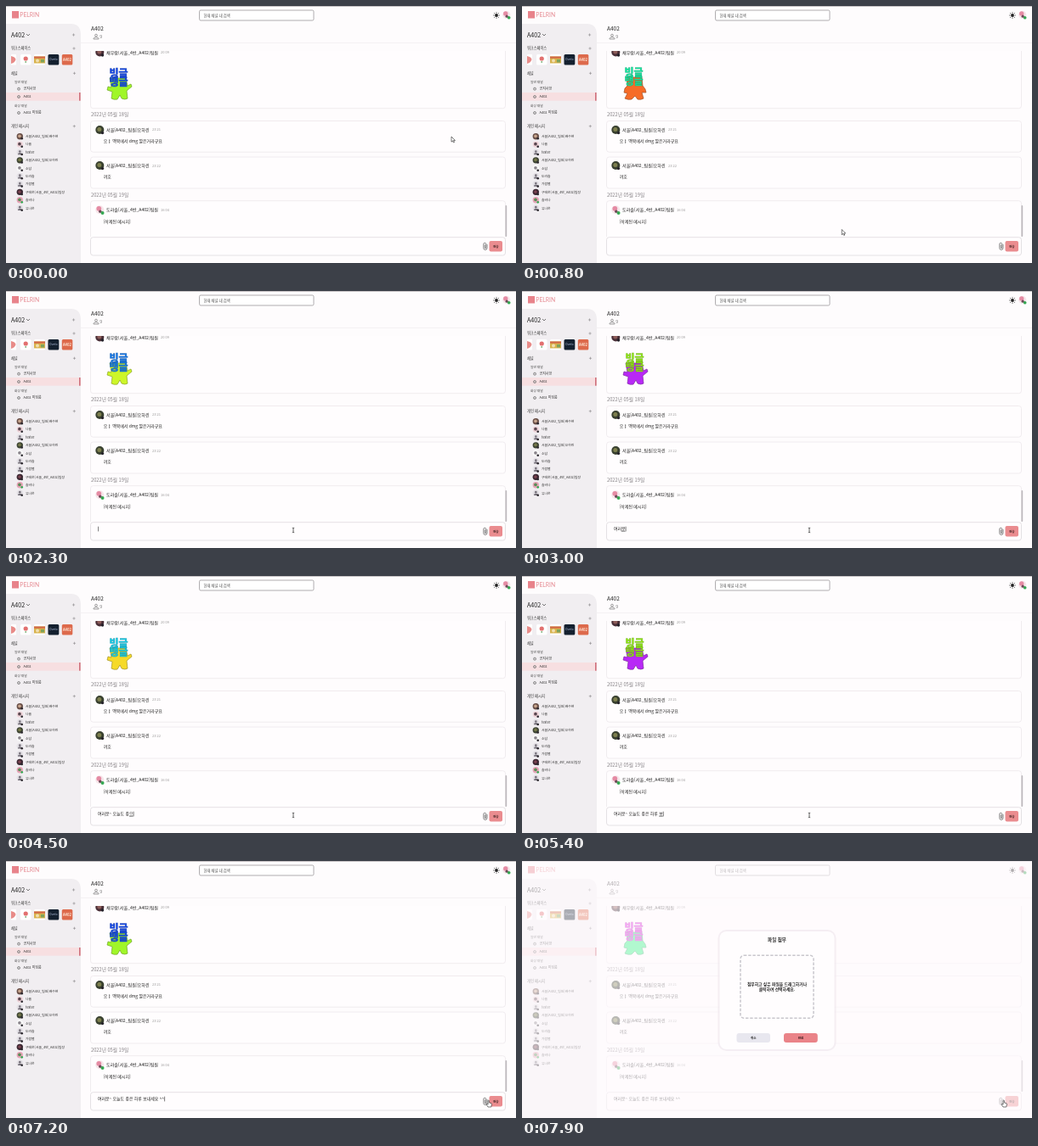
An HTML page for the animation above (8 s loop, 600x303 px).

```html
<!DOCTYPE html>
<html lang="ko">
<head>
<meta charset="utf-8">
<title>Team chat</title>
<style>
html, body { margin: 0; width: 100%; height: 100%; overflow: hidden; background: #fefcfd; }
svg { display: block; width: 600px; height: 303px; }
text { font-family: "Noto Sans CJK KR", "Noto Sans CJK", "Noto Sans", sans-serif; white-space: pre; }
</style>
</head>
<body>
<svg id="stage" viewBox="0 0 600 303" xmlns="http://www.w3.org/2000/svg"></svg>
<script>
const LOOP = 8000, STEP = 100;
const stage = document.getElementById('stage');

// Markup helpers; text is placed by its vertical centre.
const text = (x, y, str, size, fill = '#333', extra = '') =>
  `<text x="${x}" y="${y + size * 0.36}" font-size="${size}" fill="${fill}" ${extra}>${str}</text>`;
const rect = (x, y, w, h, fill, r = 0, extra = '') =>
  `<rect x="${x}" y="${y}" width="${w}" height="${h}" rx="${r}" fill="${fill}" ${extra}/>`;
const dot = (x, y, r, fill, extra = '') =>
  `<circle cx="${x}" cy="${y}" r="${r}" fill="${fill}" ${extra}/>`;
const line = (d, color, w = 0.6, extra = '') =>
  `<path d="${d}" fill="none" stroke="${color}" stroke-width="${w}" ${extra}/>`;
const plus = (x, y) => line(`M${x - 1.6} ${y}h3.2M${x} ${y - 1.6}v3.2`, '#8a868a', 0.6);
const mid = 'text-anchor="middle"';
const bold = 'font-weight="700"';

const person = (x, y, r, c) =>
  dot(x, y, r, '#e3e0e5') + dot(x, y - r * 0.25, r * 0.36, c) +
  `<path d="M${x - r * 0.65} ${y + r * 0.75}a${r * 0.65} ${r * 0.6} 0 0 1 ${r * 1.3} 0z" fill="${c}"/>`;
const photo = (x, y, r, a, b) =>
  dot(x, y, r, a) + dot(x - r * 0.1, y - r * 0.1, r * 0.5, b);
const pinkAvatar = (x, y, r) =>
  dot(x, y, r, '#f6e6ea') + dot(x - r * 0.2, y - r * 0.3, r * 0.58, '#e58ba4') +
  dot(x + r * 0.1, y + r * 0.4, r * 0.35, '#6e4a58') + dot(x + r * 0.65, y + r * 0.75, r * 0.4, '#35a853');

function header() {
  let sun = dot(577, 11, 1.9, '#222');
  for (let i = 0; i < 8; i++)
    sun += `<path d="M577 7.2v1.2" stroke="#222" stroke-width=".8" transform="rotate(${i * 45} 577 11)"/>`;
  return rect(0, 0, 600, 0.8, '#b9b6b8') +
    rect(7, 6, 8, 8.5, '#e8838b') +
    text(16.3, 10.6, 'PELRIN', 6.8, '#e58a92', 'style="font-family:Lato,sans-serif"') +
    rect(227.5, 5, 134.5, 12, '#fff', 1.6, 'stroke="#8d8a8d" stroke-width=".7"') +
    text(232.5, 11, '현재 채널 내 검색', 4.3, '#555') + sun + pinkAvatar(588.7, 10.3, 4.6);
}

function sidebar() {
  let s = `<path d="M0 21H76Q88 21 88 34V303H0z" fill="#f1eef1"/>` +
    text(6, 34, 'A402', 7.1, '#222') + line('M24 33l2 2l2-2', '#444', 0.7) + plus(79.5, 34) +
    text(6, 49.7, '워크스페이스', 4.2) + plus(80, 50) +
    text(6, 79.3, '채널', 4.2) + plus(80.5, 79.3) +
    text(6, 141.7, '개인 메시지', 4.3) + plus(80.3, 141.7);

  // Workspace tiles
  s += rect(6, 57, 6, 12.5, '#fff', 1) + `<path d="M6 59q5 1 5.5 4q-1 4-5.5 5z" fill="#e88b88"/>` +
    rect(17, 57, 12.5, 12.5, '#fff', 1.5) + dot(23.2, 62, 2.6, '#e2706f') + dot(23.2, 66, 1, '#85b783') +
    rect(33, 57, 13, 12.5, '#fff', 1.5) + rect(33, 59.5, 13, 8, '#d8b24c') +
    rect(33, 59.5, 13, 2.2, '#d26847') + dot(37, 64.5, 2, '#f0dfb0') + rect(41, 63, 4, 3.5, '#7fa35c') +
    rect(49.5, 57, 12.8, 12.5, '#14202f', 1.5) + text(55.9, 63.2, 'Ovelo', 3.6, '#b8c7e4', mid) +
    rect(65.8, 57, 12.5, 12.5, '#dd6a4c', 1.5) + text(72, 63.2, 'A402', 4.2, '#ffe9d8', mid + bold);

  s += rect(0, 102, 87.5, 9.7, '#f7dfe1') + rect(86, 102, 1.6, 9.7, '#cf6f7b') +
    text(10, 89.6, '일반 채널', 3.7, '#444') + text(10, 118, '화상 채널', 3.7, '#444');
  [[97.7, '공지사항'], [107, 'A402'], [126, 'A402 미팅룸']].forEach(([y, name]) => {
    s += dot(15, y, 1.5, 'none', 'stroke="#777" stroke-width=".8"') + dot(15, y, 0.5, '#777') +
      text(20.5, y, name, 4, '#333');
  });

  const people = [
    ['서울[A402_팀원]배수현', '#6a5048', '#c9a78f'], ['나율', '#efd5da', '#5b4850'], ['tester'],
    ['서울[A402_팀원]오하린', '#3d4433', '#75784a'], ['소담', '#fafafa', '#8b858c'], ['도라솔'], ['가람별'],
    ['구태온[서울_4반_A402]팀장', '#3a2630', '#7c4652'], ['솔비나', '#e5a3b5', '#5b8d57'], ['유나온']
  ];
  people.forEach(([name, a, b], i) => {
    const y = 153.7 + i * 9.38;
    s += (a ? photo(16.3, y, 3.7, a, b) : person(16.3, y, 3.7, '#77727b')) +
      dot(18.7, y + 2.6, 1.3, i === 8 ? '#35a853' : '#2b272d') + text(23, y, name, 3.85, '#333');
  });
  return s;
}

const card = (y, h) => rect(99.5, y, 488, h, '#fffdfe', 3, 'stroke="#ece8eb" stroke-width=".8"');
const sender = (y, name, tx, time) =>
  text(118, y, name, 5.1, '#222') + text(tx, y, time, 4, '#999');
const darkAvatar = y => photo(110.3, y, 5, '#39402f', '#7d7f4e') + dot(113.5, y + 3.6, 1.7, '#25222a');

function chat() {
  return text(100, 27, 'A402', 6.5, '#222') +
    dot(106, 34.6, 1.4, 'none', 'stroke="#777" stroke-width=".7"') +
    line('M103 39v-.6q.3-1.6 3-1.6t3 1.6v.6z', '#777', 0.7) + text(110.2, 36.3, '9', 5.4, '#777') +
    line('M88 43.5H600', '#f1edf0', 0.7) +
    `<clipPath id="list"><rect x="88" y="53" width="512" height="219"/></clipPath><g clip-path="url(#list)">` +
    card(40, 80.7) + photo(110.3, 54.5, 5, '#4b3038', '#8d5d5a') + dot(113.5, 58, 1.7, '#25222a') +
    sender(55, '채우람[서울_4반_A402]팀원', 182, '20:09') +
    text(100, 128, '2022년 05월 18일', 5.7, '#858185') +
    card(135.5, 36.7) + darkAvatar(146) + sender(146, '서울[A402_팀원]오하린', 172, '23:21') +
    text(114.7, 159.2, '오ㅑ 맥북에서 dmg 깔은거라규요', 4.95, '#222') +
    card(178, 37) + darkAvatar(188) + sender(188.2, '서울[A402_팀원]오하린', 172, '23:22') +
    text(114.7, 201.2, '꺄호', 4.95, '#222') +
    text(100, 222.6, '2022년 05월 19일', 5.7, '#858185') +
    card(229.7, 60) + pinkAvatar(110.3, 240.3, 5) +
    sender(240.6, '도라솔[서울_4반_A402]팀원', 182, '16:04') +
    text(114.7, 254, '[삭제된 메시지]', 4.95, '#222') + '</g>' +
    rect(587.5, 235, 1.7, 37, '#bdb9bd', 0.8) +
    rect(99.5, 272.7, 488, 21.3, '#fffdfe', 3, 'stroke="#dedade" stroke-width=".8"') +
    line('M566 281v4.4a2.1 2.1 0 0 1-4.2 0v-4.6a1.5 1.5 0 0 1 3 0v4.2a.7.7 0 0 1-1.5 0v-3.6', '#555', 0.7) +
    rect(568.5, 277, 15.5, 12.5, '#ea8c8f', 2) + text(576.2, 283.3, '전송', 3.6, '#3a2020', mid + bold);
}

function modal() {
  return rect(0, 0, 600, 303, '#fffbfd', 0, 'opacity=".64"') +
    rect(230.5, 81, 139, 143, '#eee6ed', 10, 'opacity=".6"') +
    rect(232.5, 83, 135, 139, '#fffdfe', 8) +
    text(300, 93.2, '파일 첨부', 5.5, '#222', mid + bold) +
    rect(257, 111.3, 86, 74, 'none', 4, 'stroke="#c9c7cd" stroke-width="1.5" stroke-dasharray="3.4 1.8"') +
    text(300, 145, '첨부하고 싶은 파일을 드래그하거나', 4.8, '#222', mid + bold) +
    text(300, 151.3, '클릭하여 선택하세요.', 4.8, '#222', mid + bold) +
    rect(252.5, 203, 39.5, 11, '#e8e7ef', 3) + text(272.2, 208.5, '취소', 3.6, '#333', mid + bold) +
    rect(308, 203, 39.8, 11, '#ea8388', 3) + text(328, 208.5, '완료', 3.6, '#3a1c1e', mid + bold);
}

stage.innerHTML = rect(0, 0, 600, 303, '#fefcfd') + header() + sidebar() + chat() +
  `<g id="sticker"><path id="body" stroke-width=".7" stroke-linejoin="round"/>
   <g id="word" font-weight="900" stroke-width=".5" text-anchor="middle">
   <text x="132" y="82.5" font-size="12">빙글</text><text x="132" y="92.5" font-size="12">뱅글</text></g></g>` +
  text(108, 280.6, '', 4.9, '#222', 'id="typed"') +
  `<path id="under" stroke="#333" stroke-width=".5"/><path id="caret" stroke="#222" stroke-width=".6"/>` +
  `<g id="modal">${modal()}</g>` +
  `<g id="arrow"><path d="M0 0V6.2L1.5 4.9L2.5 7L3.5 6.5L2.5 4.5H4.4Z" fill="#fff" stroke="#222" stroke-width=".6"/></g>
   <g id="beam">${line('M-1.2-2.8Q0-2.8 0-2V2Q0 2.8-1.2 2.8M1.2-2.8Q0-2.8 0-2M0 2Q0 2.8 1.2 2.8', '#222', 0.7)}</g>
   <g id="hand"><path d="M-.9-3.5q.8-.8 1.3 0v2.4l2.6.8q.6.3.4 1.2L2.8 4H-1L-3 .9q.2-1 1-.5l1.1.7z" fill="#fff" stroke="#222" stroke-width=".6"/></g>`;

const $ = id => document.getElementById(id);

// Every keystroke of a Korean line, one syllable part at a time.
const CHO = 'ㄱㄲㄴㄷㄸㄹㅁㅂㅃㅅㅆㅇㅈㅉㅊㅋㅌㅍㅎ';
function keystrokes(str) {
  const out = [''];
  let done = '';
  for (const ch of str) {
    const c = ch.charCodeAt(0) - 0xac00;
    if (c >= 0) {
      out.push(done + CHO[Math.floor(c / 588)]);
      if (c % 28) out.push(done + String.fromCharCode(0xac00 + c - c % 28));
    }
    done += ch;
    out.push(done);
  }
  return out;
}
const keys = keystrokes('여러분~ 오늘도 좋은 하루 보내세요');
const typedAt = t => {
  const n = Math.floor((t - 2300) / 100);
  const tail = t >= 6600 ? ' ^^' : t >= 6500 ? ' ^' : t >= 6300 ? ' ' : '';
  return keys[Math.max(0, Math.min(n, keys.length - 1))] + tail;
};

// Time, x, y of the pointer
const path = [[0, 524, 154], [200, 524, 154], [500, 455, 205], [900, 350, 283], [1400, 341, 285],
  [1900, 341, 285], [2200, 338, 282], [6500, 338, 282], [6800, 450, 284], [7100, 568, 286], [7300, 568, 286], [7600, 567, 286], [8000, 567, 286]];
function pointer(t) {
  const i = path.findIndex((p, k) => k && t <= p[0]);
  const a = path[i - 1], b = path[i], f = (t - a[0]) / (b[0] - a[0]);
  return [a[1] + (b[1] - a[1]) * f, a[2] + (b[2] - a[2]) * f];
}

// Word hue, body hue, pose for each beat of the sticker
const beats = [[225, 85, 0], [250, 95, 0], [270, 108, 1], [305, 178, 1], [340, 205, 1], [50, 240, 0],
  [85, 282, 0], [300, 145, 1], [160, 20, 1], [188, 52, 0], [200, 60, 0], [212, 72, 0]];
const poses = [
  'M122 85H141L143 94L147 92L148 95L142 100L143 109Q140 111 136 109L134 105L131 110Q127 111 124 109L125 101L119 99L120 95L124 96Z',
  'M123 84H141L142 94L145 98L146 102L141 102L143 109Q140 111 136 110L133 106L129 110Q125 111 121 109L124 103L120 102L121 97L124 94Z'
];

function draw(t) {
  const [word, body, pose] = beats[Math.floor(t / STEP) % beats.length];
  $('body').setAttribute('d', poses[pose]);
  $('body').setAttribute('fill', `hsl(${body} 92% 56%)`);
  $('body').setAttribute('stroke', `hsl(${body} 60% 40%)`);
  $('word').setAttribute('fill', `hsl(${word} 88% 50%)`);
  $('word').setAttribute('stroke', `hsl(${word} 75% 38%)`);
  $('word').setAttribute('transform', pose ? 'translate(-.5 0)' : 'translate(.5 1)');

  const str = typedAt(t);
  $('typed').textContent = str;
  const end = 108 + (str ? $('typed').getComputedTextLength() : 0);
  const composing = /[ㄱ-힣]$/.test(str) && t < 6100;
  $('under').setAttribute('d', composing ? `M${end - 4.5} 283.4H${end}` : '');
  $('caret').setAttribute('d', t >= 1900 && t < 7500 ? `M${end + 0.6} 277.7V283.4` : '');

  $('modal').setAttribute('opacity', t < 7500 ? 0 : t < 7600 ? 0.5 : 1);

  const [x, y] = pointer(t);
  const kind = y < 273 ? 'arrow' : x > 559 ? 'hand' : 'beam';
  for (const id of ['arrow', 'beam', 'hand']) {
    $(id).setAttribute('visibility', id === kind ? 'visible' : 'hidden');
    $(id).setAttribute('transform', `translate(${x} ${y})`);
  }
}

const start = performance.now();
function tick() {
  const t = (performance.now() - start) % LOOP;
  draw(Math.floor(t / STEP) * STEP);
  requestAnimationFrame(tick);
}
tick();
</script>
</body>
</html>
```
